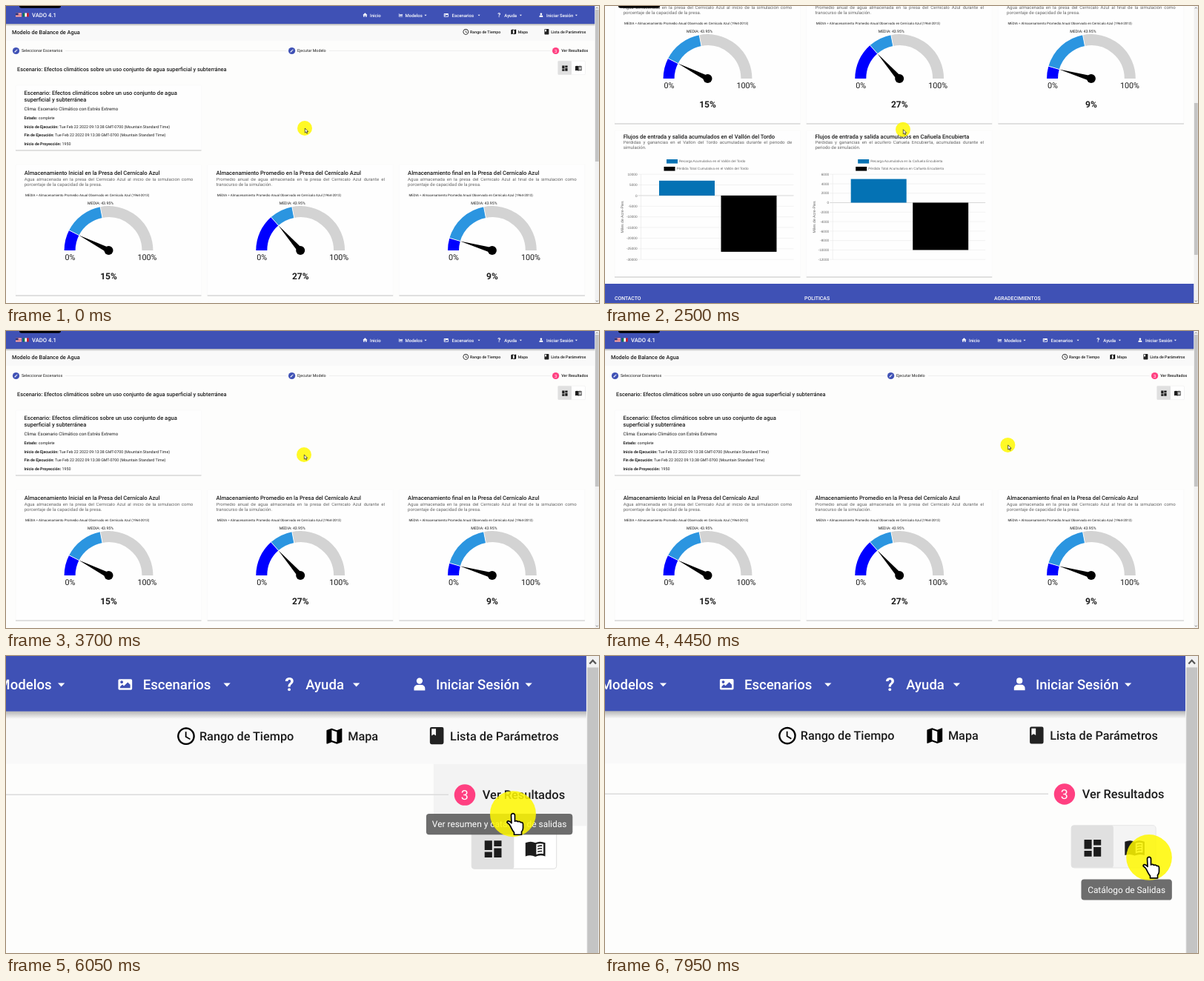
An HTML page for the animation above (8 s loop, 800x401 px).

```html
<!DOCTYPE html>
<html lang="es">
<head>
<meta charset="utf-8">
<title>Balance de Agua</title>
<style>
  html, body { margin: 0; width: 100%; height: 100%; overflow: hidden; background: #fdfdfc; }
  svg { display: block; width: 800px; height: 401px; }
  svg, p { font-family: Roboto, sans-serif; text-rendering: geometricPrecision; }
  text { fill: #1c1c1c; white-space: pre; }
  .med { font-weight: 500; }
  .bold { font-weight: 700; }
  .white { fill: #fff; }
  .mid { text-anchor: middle; }
  .end { text-anchor: end; }
  .chart { font-family: "Liberation Sans", Arial, sans-serif; fill: #666; }
  p { margin: 0; font-size: 6.05px; line-height: 6.9px; color: #666; text-align: justify; }
</style>
</head>
<body>
<svg viewBox="0 0 800 401">
  <defs>
    <linearGradient id="shade" x2="0" y2="1">
      <stop stop-opacity=".28"/><stop offset="1" stop-opacity="0"/>
    </linearGradient>
    <path id="home" d="M10 20v-6h4v6h5v-8h3L12 3 2 12h3v8z"/>
    <path id="area" d="M2 4h2.500v14H22v2.500H2zM6 16v-5l4-4 4 4 4-5 3 4v6z"/>
    <path id="image" fill-rule="evenodd" d="M3 3.500h18a2 2 0 0 1 2 2v13a2 2 0 0 1-2 2H3a2 2 0 0 1-2-2v-13a2 2 0 0 1 2-2zM4 17.500h16v-5l-4-4-6 6-2.500-2.500L4 15.500zM6.500 6a2.200 2.200 0 1 0 .01 0z"/>
    <path id="person" d="M12 11.500a5 5 0 1 0 0-10 5 5 0 0 0 0 10zM3 22v-3c0-4 3-6 6-6h6c3 0 6 2 6 6v3z"/>
    <path id="clock" fill-rule="evenodd" d="M12 2a10 10 0 1 0 .01 0zM12 4a8 8 0 1 1-.01 0zM11 7h1.500v5.200l4.500 2.700-.8 1.200L11 13z"/>
    <path id="map" fill-rule="evenodd" d="M20.500 3 15 5.100 9 3 3.400 4.900 3 5.400v15.100l.5.500L9 18.900l6 2.100 5.600-1.900.4-.5V3.500zM15 19l-6-2.100V5l6 2.100z"/>
    <path id="book" fill-rule="evenodd" d="M18 2H6a2 2 0 0 0-2 2v16a2 2 0 0 0 2 2h12a2 2 0 0 0 2-2V4a2 2 0 0 0-2-2zM6 4h5v8l-2.500-1.500L6 12z"/>
    <path id="edit" d="M3 17.250V21h3.750L17.800 9.940l-3.750-3.750zM20.700 7a1 1 0 0 0 0-1.400l-2.300-2.300a1 1 0 0 0-1.400 0l-1.900 1.800 3.750 3.750z"/>
    <path id="tiles" d="M3 13h8V3H3zM3 21h8v-6H3zM13 21h8V11h-8zM13 3v6h8V3z"/>
    <path id="open" fill-rule="evenodd" d="M1 5q6-2.500 11 0 5-2.500 11 0v15q-6-2-11 .5Q7 18 1 20zM13 6.500v11.500q4-1.500 8-.8V6.200q-4-1-8 .3zM14.500 8.300q2.500-1 5-.6V9q-2.500-.4-5 .6zM14.500 11.300q2.500-1 5-.6V12q-2.500-.4-5 .6zM14.500 14.300q2.500-1 5-.6V15q-2.500-.4-5 .6z"/>
  </defs>
  <g id="cam">
    <g id="page"></g>
    <g id="bar"></g>
    <path d="M18 0H74Q74 2.800 71 2.800H21Q18 2.800 18 0z"/>
    <g id="tips"></g>
    <g id="cursor">
      <circle r="10" fill="#fff800" opacity=".85"/>
      <path id="arrow" d="M.3 0v6.200l1.500-1.300 1 2.300 1-.5-1-2.200h1.900z" fill="#fff" stroke="#000" stroke-width=".6"/>
      <path id="hand" transform="scale(.324)" fill="#fff" stroke="#000" stroke-width="1.700" stroke-linejoin="round"
        d="M-2.500 2a2.500 2.500 0 0 1 5 0v8q2-1.500 4 .5 2.500-1 4 1 3-.5 3 2.500v5q0 3-2 5v4h-10v-3q-2-2-5-8.500-1-2.500-4.500-5 .5-3 4-1l2 2z"/>
    </g>
  </g>
</svg>
<script>
const $ = id => document.getElementById(id);
const BLUE = '#3f51b5';
const DAM = 'Cernícalo Azul', BASIN = 'Vallón del Tordo', AQUIFER = 'Cañuela Encubierta';

// Drawing helpers; text is placed by the middle of its capitals.
const text = (x, cy, size, str, cls = '') =>
  `<text x="${x}" y="${cy + size * .355}" font-size="${size}" class="${cls}">${str}</text>`;
const title = (x, cy, str) => text(x, cy, 7.6, str, 'med');
const rect = (x, y, w, h, fill, extra = '') =>
  `<rect x="${x}" y="${y}" width="${w}" height="${h}" fill="${fill}" ${extra}/>`;
const line = (x1, y1, x2, y2, color, width = .5) =>
  `<path d="M${x1} ${y1}L${x2} ${y2}" stroke="${color}" stroke-width="${width}"/>`;
const icon = (id, cx, cy, size, fill = '#1c1c1c') =>
  `<use href="#${id}" fill="${fill}" transform="translate(${cx - size / 2} ${cy - size / 2}) scale(${size / 24})"/>`;
const para = (x, y, str) =>
  `<foreignObject x="${x}" y="${y}" width="227.500" height="20"><p>${str}</p></foreignObject>`;
const card = (x, y, bottom) =>
  rect(x, y, 250.5, bottom - y, '#fefefe', 'stroke="#f6f6f6" stroke-width=".5" rx="1"') +
  line(x, bottom, x + 250.5, bottom, '#b4b4b4', .8);

function flags() {
  let s = rect(13, 9.5, 8, 5, '#fff');
  for (let i = 0; i < 4; i++) s += rect(13, 9.5 + i * 1.4, 8, .75, '#d22f3c');
  s += rect(13, 9.5, 3.6, 2.8, '#2b3a80');
  return s + ['#0b7a4b', '#fff', '#d0202e'].map((c, i) => rect(22.7 + i * 2.7, 9.5, 2.7, 5, c)).join('');
}

function header() {
  const caret = x => `<path d="M${x - 1.5} 11.800h3l-1.500 1.600z" fill="#fff"/>`;
  const item = (x, str) => text(x, 12.4, 6, str, 'med white');
  return rect(0, 24, 794.5, 23, '#f9f9f9') + rect(0, 24, 794.5, 3.4, 'url(#shade)') +
    rect(0, 0, 794.5, 24.1, BLUE) + flags() + text(35, 12.4, 7.7, 'VADO 4.1', 'med white') +
    icon('home', 484.4, 12.2, 7.6, '#fff') + item(491, 'Inicio') +
    icon('area', 532.5, 12.3, 6.4, '#fff') + item(538.5, 'Modelos') + caret(566) +
    icon('image', 593.8, 12.4, 6.6, '#fff') + item(601.5, 'Escenarios') + caret(638.1) +
    text(665.3, 12.4, 8, '?', 'bold white mid') + item(672.3, 'Ayuda') + caret(694.4) +
    icon('person', 721.9, 12.3, 6.4, '#fff') + item(729, 'Iniciar Sesión') + caret(769.4) +
    text(8, 35.5, 7.35, 'Modelo de Balance de Agua', 'med') +
    icon('clock', 620.3, 34.9, 9.2, '#000') + text(626.1, 34.8, 5.25, 'Rango de Tiempo', 'med') +
    icon('map', 684.8, 34.9, 9, '#000') + text(690.7, 34.8, 5.25, 'Mapa', 'med') +
    icon('book', 729.4, 34.7, 9, '#222') + text(735.2, 34.8, 5.25, 'Lista de Parámetros', 'med');
}

function stepper() {
  const dot = (x, fill) => `<circle cx="${x}" cy="60.500" r="4.600" fill="${fill}"/>`;
  const done = (x, str) => dot(x, BLUE) + icon('edit', x, 60.5, 5.6, '#fff') + text(x + 7.4, 60.5, 5.35, str);
  return `<rect id="stepHover" x="728" y="47" width="66.500" height="27" fill="#f3f3f3"/>` +
    line(80, 60.4, 378, 60.4, '#dcdcdc') + line(436, 60.4, 734.5, 60.4, '#dcdcdc') +
    done(13.5, 'Seleccionar Escenarios') + done(385.6, 'Ejecutar Modelo') +
    dot(741.6, '#ff4081') + text(741.6, 60.5, 5.8, '3', 'white mid') +
    text(749.3, 60.5, 5.3, 'Ver Resultados', 'med');
}

function toggle() {
  return rect(744.6, 74.2, 36.9, 18.5, '#fff', 'rx="1.300" stroke="#e4e4e4" stroke-width=".4"') +
    `<rect id="bookHover" x="763" y="74.400" width="18.300" height="18.100" fill="#f4f4f4"/>` +
    rect(744.6, 74.2, 18.4, 18.5, '#e0e0e0', 'rx="1"') +
    icon('tiles', 753.9, 84.1, 9.8) + icon('open', 772.3, 84.1, 9.4);
}

function summary() {
  const stamp = 'Tue Feb 22 2022 09:13:38 GMT-0700 (Mountain Standard Time)';
  const rows = [['Estado', 'complete'], ['Inicio de Ejecución', stamp],
                ['Fin de Ejecución', stamp], ['Inicio de Proyección', '1950']];
  const topic = 'Escenario: Efectos climáticos sobre un uso conjunto de agua';
  return text(15, 85.3, 7.35, topic + ' superficial y subterránea', 'med') + card(13, 107, 195) +
    title(24.5, 117.3, topic) + title(24.5, 126.5, 'superficial y subterránea') +
    text(24.5, 139, 6.1, 'Clima: Escenario Climático con Estrés Extremo') +
    rows.map(([k, v], i) => text(24.5, 151.6 + i * 11.5, 5.3, `<tspan class="bold">${k}:</tspan> ${v}`)).join('');
}

function gauge(x, value, name, note) {
  const cx = x + 125.5, cy = 330, mean = .4395;
  const at = (f, r) => `${cx - r * Math.cos(Math.PI * f)} ${cy - r * Math.sin(Math.PI * f)}`;
  const arc = (a, b, color) =>
    `<path d="M${at(a, 52.4)}A52.400 52.400 0 0 1 ${at(b, 52.4)}" fill="none" stroke="${color}" stroke-width="15"/>`;
  const gap = f => `<path d="M${at(f, 43)}L${at(f, 61)}" stroke="#fff" stroke-width=".9"/>`;
  return card(x, 214, 391) + title(x + 11.7, 225, name) + para(x + 11.7, 232, note) +
    text(x + 13, 255, 4.45, `MEDIA = Almacenamiento Promedio Anual Observado en ${DAM} (1964-2013)`) +
    text(cx - 11, 266, 5.2, 'MEDIA: 43.95%', 'mid') +
    arc(0, value, '#00f') + arc(value, mean, '#2b95e0') + arc(mean, 1, '#d3d3d3') + gap(value) + gap(mean) +
    `<path d="M${cx} ${cy - 3.6}L${cx - 45} ${cy}L${cx} ${cy + 3.6}z" transform="rotate(${180 * value} ${cx} ${cy})"/>` +
    `<circle cx="${cx}" cy="${cy}" r="6"/>` +
    text(cx - 52, 339.2, 10.75, '0%', 'mid') + text(cx + 52, 339.2, 10.75, '100%', 'mid') +
    text(cx, 365, 12, Math.round(value * 100) + '%', 'bold mid');
}

function chart(x, c) {
  const top = 459.2, mid = x + 139.5, rows = (c.max - c.min) / c.step;
  const y = v => top + (c.max - v) / (c.max - c.min) * 115;
  let s = card(x, 400, 598) + title(x + 11.7, 408, `Flujos de entrada y salida acumulados en ${c.where}`) +
    para(x + 11.7, 414, c.note);
  [['#0472b4', c.gain, 441.8], ['#000', c.loss, 451.8]].forEach(([color, [dx, str], cy]) => {
    s += rect(x + dx, cy - 2.8, 15, 5.6, color) + text(x + dx + 17, cy, 4.65, str, 'chart');
  });
  for (let i = 0; i <= rows; i++) {
    const v = c.max - i * c.step;
    s += line(mid - 108, y(v), mid + 102, y(v), v ? '#e4e4e4' : '#b0b0b0') + text(mid - 109, y(v), 4.7, v, 'chart end');
  }
  s += line(mid - 104, top, mid - 104, top + 115, '#e0e0e0') +
    rect(mid - 79.5, y(c.up), 75, y(0) - y(c.up), '#0472b4') +
    rect(mid + 4, y(0), 75, y(c.down) - y(0), '#000');
  return s + `<g transform="translate(${x + 10.5} 517) rotate(-90)">${text(0, 0, 5.2, 'Miles de Acre-Pies', 'chart mid')}</g>`;
}

function footer() {
  const heads = ['CONTACTO', 'POLITICAS', 'AGRADECIMIENTOS'];
  return rect(0, 607, 794.5, 134, BLUE) + heads.map((h, i) => text(13 + i * 256, 626.3, 6.9, h, 'med white')).join('');
}

$('page').innerHTML = header() + stepper() + toggle() + summary() +
  gauge(13, .15, `Almacenamiento Inicial en la Presa del ${DAM}`,
    `Agua almacenada en la presa del ${DAM} al inicio de la simulación como porcentaje de la capacidad de la presa.`) +
  gauge(271.7, .27, `Almacenamiento Promedio en la Presa del ${DAM}`,
    `Promedio anual de agua almacenada en la presa del ${DAM} durante el transcurso de la simulación.`) +
  gauge(530.4, .09, `Almacenamiento final en la Presa del ${DAM}`,
    `Agua almacenada en la presa del ${DAM} al final de la simulación como porcentaje de capacidad de la presa.`) +
  chart(13, {
    where: `el ${BASIN}`, max: 10000, min: -30000, step: 5000, up: 7000, down: -26400,
    note: `Pérdidas y ganancias en el ${BASIN} acumuladas durante el periodo de simulación.`,
    gain: [70, `Recarga Acumulativa en el ${BASIN}`], loss: [66.5, `Pérdida Total Cumulativa en el ${BASIN}`]
  }) +
  chart(271.7, {
    where: AQUIFER, max: 6000, min: -12000, step: 2000, up: 5000, down: -10000,
    note: `Pérdidas y ganancias en el acuífero ${AQUIFER}, acumuladas durante el periodo de simulación.`,
    gain: [69.5, `Recarga Acumulativa en la ${AQUIFER}`], loss: [66.5, `Pérdida Total Acumulativa en ${AQUIFER}`]
  }) + footer();

$('bar').innerHTML = rect(794.5, 0, 5.5, 401, '#f1f1f1') +
  '<rect id="thumb" x="794.900" width="4.800" height="205" fill="#c4c4c4"/>' +
  '<path d="M795.900 3.400l1.400-1.500 1.400 1.500M795.900 397.600l1.400 1.500 1.400-1.500" fill="none" stroke="#555" stroke-width=".7"/>';

const tip = (id, x, y, w, str) => `<g id="${id}">${rect(x, y, w, 9.1, '#616161', 'fill-opacity=".92" rx="1.300"')}` +
  text(x + w / 2, y + 4.5, 3.85, str, 'white mid') + '</g>';
$('tips').innerHTML = tip('stepTip', 724.8, 68.7, 63.7, 'Ver resumen y catálogo de salidas') +
  tip('bookTip', 748.9, 97.8, 39.7, 'Catálogo de Salidas');

// Each key is [ms, ...values].
const LOOP = 8000;
const scrollKeys = [[1650, 0], [2200, 232], [2992, 232], [3500, 0]];
const stepTipKeys = [[5600, 0], [5720, 1], [6220, 1], [6320, 0]];
const bookTipKeys = [[7200, 0], [7330, 1]];
const cursorKeys = [
  [200, 403, 165], [500, 406, 168], [1000, 403, 167], [1150, 402, 166.5], [3950, 402, 167],
  [4450, 543, 154], [4800, 671, 119], [5080, 752, 68], [5250, 765.3, 61], [5700, 765.3, 61],
  [6050, 762.6, 68.7], [6350, 754.5, 85], [6550, 752, 88], [6650, 752, 88], [7350, 778.6, 88.2]
];

function sample(keys, t) {
  const i = keys.findIndex(k => k[0] > t);
  if (i < 0) return keys[keys.length - 1].slice(1);
  if (i === 0) return keys[0].slice(1);
  const a = keys[i - 1], b = keys[i], u = (t - a[0]) / (b[0] - a[0]);
  return a.slice(1).map((v, j) => v + (b[j + 1] - v) * u);
}

function smooth(t, start, length) {
  const u = Math.min(1, Math.max(0, (t - start) / length));
  return u * u * (3 - 2 * u);
}

const show = (id, on) => $(id).setAttribute('visibility', on ? 'visible' : 'hidden');

function draw(t) {
  const zoom = 1 + 2.1 * (smooth(t, 4850, 1205) - smooth(t, 7850, 1930));
  const [offset] = sample(scrollKeys, t);
  const [x, y] = sample(cursorKeys, t);
  const onStep = x > 728 && y > 47 && y < 74;
  const onToggle = x > 744 && y >= 74 && y < 93;

  $('cam').setAttribute('transform', `translate(${800 * (1 - zoom)} 0) scale(${zoom})`);
  $('page').setAttribute('transform', `translate(0 ${-Math.round(offset)})`);
  $('thumb').setAttribute('y', 5 + offset * .543);
  $('cursor').setAttribute('transform', `translate(${x} ${y})`);
  $('stepTip').setAttribute('opacity', sample(stepTipKeys, t)[0]);
  $('bookTip').setAttribute('opacity', sample(bookTipKeys, t)[0]);
  show('stepHover', onStep);
  show('bookHover', onToggle && x > 763);
  show('hand', onStep || onToggle);
  show('arrow', !onStep && !onToggle);
}

const begin = performance.now();
function tick() {
  draw((performance.now() - begin) % LOOP);
  requestAnimationFrame(tick);
}
tick();
</script>
</body>
</html>
```
